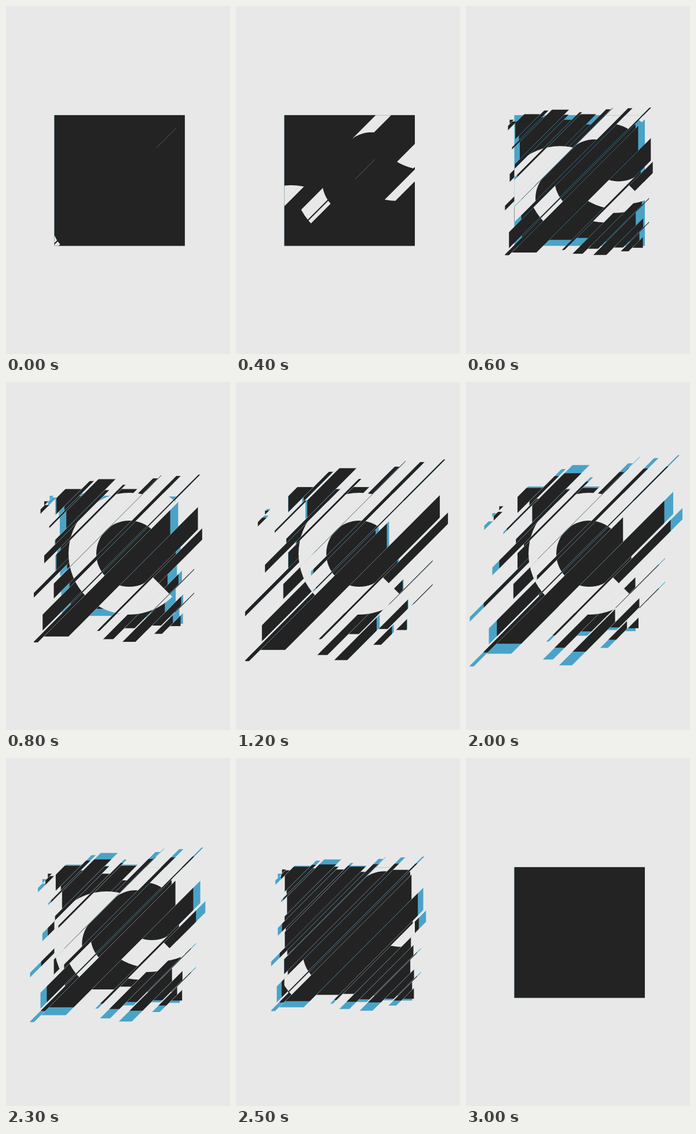
An HTML page with a canvas for the animation above (3.1 s loop, 387 by 600 pixels).

```html
<!DOCTYPE html>
<html>
<head>
<meta charset="utf-8">
<style>
html, body { margin: 0; height: 100%; overflow: hidden; background: #e8e8e8; }
canvas { display: block; }
</style>
</head>
<body>
<canvas id="stage" width="387" height="600"></canvas>
<script>
const ctx = document.getElementById('stage').getContext('2d');
const PAPER = '#e8e8e8', INK = '#232323', BLUE = '#4aa3c7';
const BOX = [83.5, 188.2, 225.5, 225.3];
const CX = 213, CY = 296, INNER = 57, OUTER = 105, MIDDLE = CX + CY;
const LOOP = 3100, STEP = 100, LAG = 200;

// The square is cut along x + y = const: where each band ends, and its furthest slide.
let edge = 271;
const BANDS = [
  [279, -38], [287, -52], [315, 8], [323, 38], [327, -19], [357, 45], [365, 4],
  [379, -38], [384, 24], [411.5, 8], [420, -77], [428.5, 48], [430, 59],
  [456, -2], [464, 57], [492, -44], [495.5, 62], [504, -77], [547, -55],
  [586, 49], [591, -34], [611, 65], [629, -65], [647, -24], [649, 35],
  [672, -75], [688, -14], [690, 35], [704, -45], [724, -16]
].map(([to, reach]) => {
  const band = { from: edge, to, reach };
  edge = to;
  return band;
});

// Wide bands carry a piece of the ring; the one through its centre stays solid.
const PIECES = BANDS
  .filter(({ from, to }) => to - from > 8 && (to < MIDDLE || from > MIDDLE) && to > 360 && from < 660)
  .flatMap(({ from, to }) => {
    const piece = (side, slide) => ({ from, to, side, slide });
    const far = Math.abs((from + to) / 2 - MIDDLE);
    if (from > MIDDLE) return [piece(-1, 57 + 2 * Math.abs(far - 88))];
    const left = -Math.min(118, 7 + 2.2 * Math.max(0, far - 31));
    if (to < 429) return [piece(0, left)];
    return [piece(-1, left), piece(1, 140 - 1.8 * far)];
  });

const RISE = [[400, 0], [600, .21], [800, .46], [1000, .81], [1200, .88], [1800, 1]];

function spreadAt(t) {
  if (t <= 400 || t >= 2700) return 0;
  if (t >= 1800) return (1 - (t - 1800) / 900) ** 1.5;
  const i = RISE.findIndex(([time]) => t <= time);
  const [t0, a] = RISE[i - 1], [t1, b] = RISE[i];
  return a + (b - a) * (t - t0) / (t1 - t0);
}

function slideAt(t, slide) {
  const way = Math.sign(slide);
  if (t < 400) return slide + way * 70 * (1 - t / 400);
  if (t < 750) return slide * (750 - t) / 350;
  if (t < 2100) return 0;
  return way * (40 + slide * slide / 120) * ((t - 2100) / 400) ** 2;
}

function clipBand(from, to) {
  ctx.beginPath();
  ctx.moveTo(from + 400, -400);
  ctx.lineTo(to + 400, -400);
  ctx.lineTo(to - 1000, 1000);
  ctx.lineTo(from - 1000, 1000);
  ctx.clip();
}

function clipSide(side) {
  ctx.beginPath();
  ctx.moveTo(CX - 500, CY - 500);
  ctx.lineTo(CX + 500, CY + 500);
  ctx.lineTo(CX + 500 + 1000 * side, CY + 500 - 1000 * side);
  ctx.lineTo(CX - 500 + 1000 * side, CY - 500 - 1000 * side);
  ctx.clip();
}

function drawSquare(spread, color) {
  ctx.fillStyle = color;
  if (!spread) return ctx.fillRect(...BOX);
  for (const { from, to, reach } of BANDS) {
    const d = reach * spread;
    ctx.save();
    clipBand(from + .35, to - .35); // leaves a hairline between bands
    ctx.translate(d, -d);
    ctx.fillRect(...BOX);
    ctx.restore();
  }
}

function drawPiece({ from, to, side, slide }, t) {
  const d = slideAt(t, slide);
  ctx.save();
  ctx.beginPath();
  ctx.rect(...BOX);
  ctx.clip();
  clipBand(from - .3, to + .3);
  ctx.translate(d, -d);
  if (side) clipSide(side);
  ctx.beginPath();
  ctx.arc(CX, CY, side > 0 ? OUTER + 15 : OUTER, 0, 7);
  ctx.moveTo(CX + INNER, CY);
  ctx.arc(CX, CY, INNER, 0, 7);
  ctx.fillStyle = PAPER;
  ctx.fill('evenodd');
  ctx.restore();
}

function drawHair(t) {
  const x = 260 - 54 * t / 400;
  ctx.beginPath();
  ctx.moveTo(x, 504.5 - x);
  ctx.lineTo(x + 34, 470.5 - x);
  ctx.strokeStyle = '#777';
  ctx.lineWidth = .7;
  ctx.stroke();
}

function draw(now) {
  const t = Math.floor(now % LOOP / STEP) * STEP;
  ctx.fillStyle = PAPER;
  ctx.fillRect(0, 0, 387, 600);
  drawSquare(spreadAt(t - LAG), BLUE);
  drawSquare(spreadAt(t), INK);
  for (const piece of PIECES) drawPiece(piece, t);
  if (t < 600) drawHair(t);
}

const begin = performance.now();
function tick() {
  draw(performance.now() - begin);
  requestAnimationFrame(tick);
}
tick();
</script>
</body>
</html>
```
